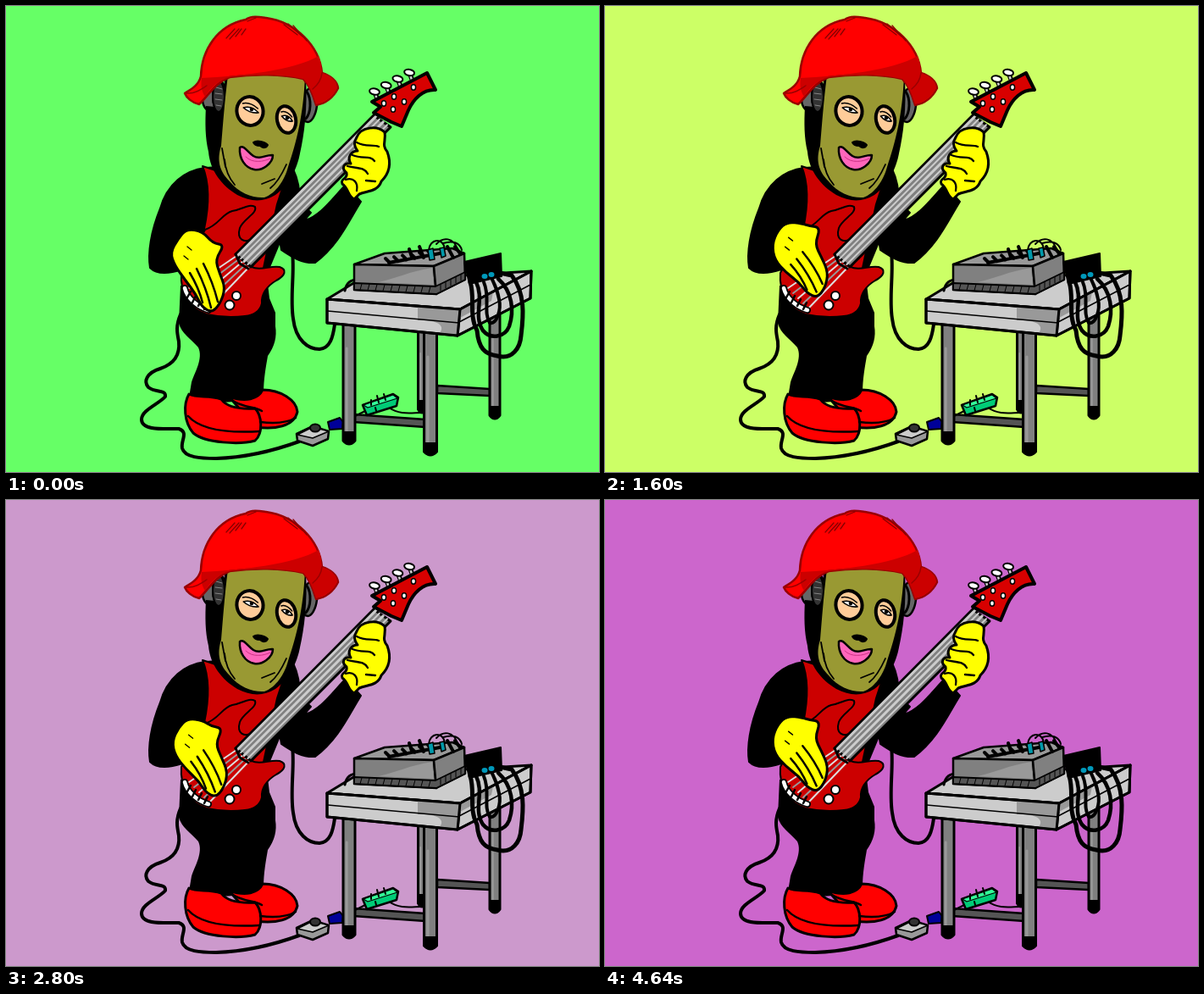
Recreate the animation shown at these times as an HTML page with a canvas. Size 700 by 550 pixels, loop 4720 ms.

```html
<!DOCTYPE html>
<html lang="en">
<head>
<meta charset="utf-8">
<title>Bass player</title>
<style>
html, body { margin: 0; width: 100%; height: 100%; overflow: hidden; }
canvas { display: block; }
</style>
</head>
<body>
<canvas id="stage" width="700" height="550"></canvas>
<script>
const ctx = document.getElementById('stage').getContext('2d');
const STEP = 80, STEPS = 59, CYCLE = 19;
const BLACK = '#000', RED = '#f00', DEEP = '#c00', YELLOW = '#ff0';

const backdrops = ['#66ff66', '#99ff66', '#99cc99', '#99cccc', '#66cccc', '#99ffcc',
  '#99ff99', '#ccff99', '#ccff66', '#cc9966', '#cc66cc', '#cc99cc'];

// Each head pose: hat shift and tilt, hood shift, feature shift and eye tilt
const headPoses = [
  { hat: [0, 0], tilt: 0, hood: [0, 0], face: [0, 0], eyes: 0 },
  { hat: [-10, -4], tilt: -5.8, hood: [-9, -6], face: [-5, -6], eyes: -7 },
  { hat: [-15.5, -8.5], tilt: -10.5, hood: [-13, -9], face: [-9, -10], eyes: -7 }
];
const strumKeys = [[0, 1], [1, .68], [6, 0], [7, .08], [11, .25], [16, .8], [19, 1]];

const highHand = [[204, 262], [206, 243], [220, 237], [235, 238], [236, 216], [247, 218],
  [249, 243], [263, 257], [273, 275], [275, 292], [267, 307], [255, 305], [240, 297], [218, 295], [203, 286]];
const lowHand = [[194, 291], [203, 275], [213, 263], [232, 266], [244, 280], [258, 282],
  [247, 299], [252, 315], [259, 333], [253, 351], [243, 362], [231, 355], [224, 340], [212, 324], [199, 306]];
const highFingers = [[234, 261, 271, 283], [229, 274, 266, 298], [224, 284, 252, 303]];
const lowFingers = [[233, 304, 250, 349], [225, 310, 242, 356], [217, 315, 232, 350]];

const mix = (a, b, t) => a + (b - a) * t;
const mixList = (a, b, t) => a.map((v, i) => mix(v, b[i], t));

function shape(d, fill, stroke = BLACK, width = 3) {
  const path = new Path2D(d);
  if (fill) { ctx.fillStyle = fill; ctx.fill(path); }
  if (stroke) { ctx.strokeStyle = stroke; ctx.lineWidth = width; ctx.stroke(path); }
}
const line = (d, color = BLACK, width = 3) => shape(d, null, color, width);

function oval(x, y, rx, ry, fill, width = 2, angle = 0) {
  ctx.beginPath();
  ctx.ellipse(x, y, rx, ry, angle, 0, Math.PI * 2);
  ctx.fillStyle = fill;
  ctx.fill();
  if (width) { ctx.strokeStyle = BLACK; ctx.lineWidth = width; ctx.stroke(); }
}

function moved([dx, dy], degrees, [px, py], draw) {
  ctx.save();
  ctx.translate(px + dx, py + dy);
  ctx.rotate(degrees * Math.PI / 180);
  ctx.translate(-px, -py);
  draw();
  ctx.restore();
}

function strumAt(phase) {
  const i = strumKeys.findIndex(k => k[0] > phase) - 1;
  const [a, va] = strumKeys[i], [b, vb] = strumKeys[i + 1];
  return mix(va, vb, (phase - a) / (b - a));
}

function headAt(phase) {
  if (phase < 3 || phase > 14) return headPoses[0];
  return headPoses[phase > 8 && phase < 13 ? 2 : 1];
}

function cables() {
  line('M206 364C200 378 202 386 204 396C206 416 194 424 182 428C166 433 162 443 168 450C177 457 189 452 188 461C180 470 160 477 160 488C160 501 185 499 204 499C216 503 206 513 208 522C211 533 230 534 248 534C282 533 313 526 346 514', BLACK, 4);
  line('M338 292C341 312 335 345 339 369C342 395 357 405 370 405C383 404 386 390 388 376', BLACK, 4);
}

function body() {
  shape('M206 330L204 374C207 387 218 392 227 403C233 416 223 432 219 444L216 462C245 472 285 468 304 458C304 440 307 425 309 413C317 402 320 390 318 378L318 362L311 345L308 320Z', BLACK, null);
  shape('M263 461C283 468 298 464 303 453C324 453 343 465 344 479C340 497 316 500 295 497Z', RED);
  shape('M216 458C209 470 210 491 221 504C235 516 276 518 294 513C304 504 302 483 294 475C277 476 261 474 254 464C239 459 226 463 216 458Z', RED);
  line('M215 484C231 502 267 504 300 502M265 464C279 475 294 472 302 478M300 491C317 493 332 492 342 486', BLACK, 2.5);
  shape('M235 191C211 194 190 210 182 239C171 266 167 292 170 309C179 318 196 315 208 311L220 345L306 320L347 221C343 206 338 194 336 185Z', BLACK, BLACK, 2);
  shape('M232 189C241 211 240 235 234 263L210 320L300 328L320 234L337 182L315 216Z', DEEP, BLACK, 2);
  shape('M338 190C344 203 348 216 346 231L360 244C357 248 354 250 353 253C372 247 386 226 401 211L419 231C405 253 393 282 365 303C350 304 338 297 325 288L318 245Z', BLACK, BLACK, 2);
}

function headphones() {
  oval(244, 109, 12, 16, '#666', 2.5, .1);
  oval(252, 107, 8, 19, '#333', 2);
  line('M248 96L257 98M247 103L257 104M247 110L257 111M248 117L256 118', '#888', 1);
  oval(358, 117, 9, 20, '#666', 2.5, .12);
  line('M355 101C361 110 360 126 354 133', BLACK, 3);
}

function hood() {
  headphones();
  shape('M258 84L257 120L236 118C235 138 235 155 239 172C241 195 255 212 273 223C290 232 305 231 318 223C336 210 344 190 347 174C352 152 356 122 354 84Z', BLACK, null);
  oval(251, 107, 7, 18, '#333', 2);
  line('M248 96L255 98M247 103L255 104M247 110L255 111M248 117L254 118', '#888', 1);
  shape('M262 82C258 112 256 142 254 165C249 181 251 194 264 207C275 221 292 227 305 226C319 221 329 205 333 190C343 160 351 130 353 82Z', '#999933', null);
  line('M258 181C259 194 264 204 270 211M259 190L255 168M312 215C320 209 326 198 331 187M302 210L317 204', BLACK, 1.8);
}

function eye(x, y, rx, ry, lookX) {
  oval(x, y, rx, ry, '#ffcc99', 4, -.2);
  shape(`M${x - rx * .5} ${y - 4}Q${x + 2} ${y - 7} ${x + rx * .65} ${y + 2}Q${x} ${y + 3} ${x - rx * .5} ${y - 4}Z`, '#fff', BLACK, 1.6);
  oval(x + lookX, y - 2, 2.3, 2.3, BLACK, 0);
  line(`M${x - rx * .55} ${y - 9}Q${x} ${y - 11} ${x + rx * .6} ${y - 3}`, BLACK, 1.5);
}

function features(tilt) {
  moved([0, 0], tilt, [309, 129], () => {
    eye(288, 124, 15.5, 17, 2);
    eye(331, 134, 11, 16, 1);
  });
  shape('M292 161C296 158 306 160 309 164C307 168 303 168 300 165C295 165 293 164 292 161Z', BLACK, BLACK, 2);
  shape('M276 167C281 164 285 172 292 177C300 182 307 175 315 176C315 186 302 195 293 193C282 191 275 180 276 167Z', '#ff66bb', BLACK, 2.5);
  line('M283 178C291 186 304 184 312 180', '#cc3388', 1);
}

function hat() {
  shape('M230 83C231 52 249 23 283 16C290 11 300 13 307 14C342 19 370 47 373 79C385 83 391 90 392 97C386 109 377 115 366 117C362 103 358 93 351 86C326 80 292 80 264 84C246 91 239 106 228 116C219 114 213 108 211 103C219 98 227 94 230 83Z', RED, '#900', 2.5);
  shape('M231 85C275 83 340 76 369 59C372 66 372 72 373 79C385 83 391 90 391 97C385 108 377 113 366 116C362 103 358 93 351 86C326 80 292 80 264 84C250 88 241 97 235 107C230 100 230 92 231 85Z', DEEP, null);
  line('M213 103C223 104 231 98 237 94M373 79C372 88 367 94 362 98', '#900', 1.5);
  line('M260 38L270 27M264 39L275 27M271 36L278 27M278 34L283 27M328 22L344 34M333 21L350 36M339 23L355 41M285 18L295 14', '#800', 1.3);
}

function guitar() {
  shape('M235 264C252 258 254 246 267 242C280 240 286 233 294 237C297 245 280 251 276 262C272 276 281 280 291 275L300 295L290 308C300 313 312 306 323 308C332 311 330 318 319 324C307 331 301 341 302 351C300 360 292 365 282 366C266 368 251 367 237 364C218 359 205 339 207 315Z', DEEP, BLACK, 2);
  for (let i = 0; i < 5; i++) {
    line(`M${272 + i * 4} ${295 + i * 3}L${216 + i * 6} ${333 + i * 6}`, i % 2 ? '#999' : '#ddd', 2);
  }
  shape('M434 129L454 143L289 308L271 293Z', '#808080', BLACK, 3);
  [.12, .34, .56, .8].forEach((t, i) => {
    line(`M${mix(434, 454, t)} ${mix(129, 143, t)}L${mix(271, 289, t)} ${mix(293, 308, t)}`, '#ccc', i % 2 ? 2 : 3);
  });
  line('M271 293L276 304L286 310', BLACK, 3);
  line('M211 333C214 346 228 356 239 359', BLACK, 8);
  line('M211 333C214 346 228 356 239 359', '#fff', 4.5);
  line('M218 337L214 344M224 342L220 350M231 346L227 354M238 350L234 358', BLACK, 2.5);
  oval(272, 342, 5, 5, '#fff');
  oval(264, 353, 5.5, 5.5, '#fff');
}

function headstock() {
  for (let i = 0; i < 4; i++) {
    const x = 435 + i * 13.7, y = 101 - i * 7.5;
    line(`M${x} ${y}L${x + 5} ${y + 13}`, BLACK, 5.5);
    line(`M${x} ${y}L${x + 4} ${y + 12}`, '#ccc', 2.5);
    oval(x, y, 6, 3.6, '#fff', 2, .2);
  }
  shape('M432 113L497 79L507 99C492 98 481 110 475 123L467 142L455 137L434 126L442 119Z', '#d80000', BLACK, 4);
  [[446, 115], [458, 107], [470, 113], [457, 122], [481, 96]].forEach(([x, y]) => oval(x, y, 2.6, 3.2, '#fff', 1.5));
}

function frettingHand() {
  shape('M414 155C419 142 439 141 447 149C449 159 443 164 450 172C456 188 451 199 443 207C439 219 427 218 417 222L411 228C403 224 405 216 397 210C394 203 404 205 402 197C395 191 399 185 407 186C402 178 408 171 415 171C410 164 411 160 414 155Z', YELLOW, BLACK, 3);
  line('M414 161C424 167 433 163 440 166M409 176C421 181 430 176 435 183M403 189C415 192 423 190 427 198M401 205C410 202 416 208 414 218M425 206L436 207', BLACK, 2.3);
}

function strummingHand(t) {
  const pts = highHand.map((p, i) => mixList(p, lowHand[i], t));
  const mid = (a, b) => mixList(a, b, .5);
  ctx.beginPath();
  ctx.moveTo(...mid(pts[pts.length - 1], pts[0]));
  pts.forEach((p, i) => ctx.quadraticCurveTo(...p, ...mid(p, pts[(i + 1) % pts.length])));
  ctx.closePath();
  ctx.fillStyle = YELLOW;
  ctx.fill();
  ctx.strokeStyle = BLACK;
  ctx.lineWidth = 3;
  ctx.stroke();
  highFingers.forEach((f, i) => {
    const [x1, y1, x2, y2] = mixList(f, lowFingers[i], t);
    const bend = mix(-3, 0, t);
    line(`M${x1} ${y1}Q${(x1 + x2) / 2 + 3} ${(y1 + y2) / 2 + bend} ${x2} ${y2}`, BLACK, 2.5);
  });
  const [kx, ky] = mixList([222, 250], [214, 284], t);
  line(`M${kx} ${ky}l5 4M${kx - 4} ${ky + 11}l5 4`, BLACK, 1.3);
}

function leg(x, top, bottom, width) {
  const l = x - width / 2, r = x + width / 2;
  shape(`M${l} ${top}L${l} ${bottom}Q${x} ${bottom + 8} ${r} ${bottom}L${r} ${top}Z`, '#808080', BLACK, 3);
  line(`M${l + width * .3} ${top + 30}L${l + width * .3} ${bottom - 9}`, '#999', width * .2);
  shape(`M${l} ${bottom - 10}L${l} ${bottom}Q${x} ${bottom + 8} ${r} ${bottom}L${r} ${bottom - 10}Z`, BLACK, BLACK, 2);
}

function pedals() {
  line('M396 492L424 478', BLACK, 2);
  line('M452 474C465 483 478 480 491 480', BLACK, 2);
  shape('M343 505L362 496L381 502L380 511L362 519L344 513Z', '#999', BLACK, 2.5);
  shape('M344 506L362 510L381 502L362 497Z', '#ccc', BLACK, 1.5);
  oval(365, 498, 6, 4.5, '#333');
  shape('M380 491L394 486L398 491L397 499L382 500Z', '#000099', BLACK, 2);
  shape('M421 471L457 458L463 462L461 472L426 483Z', '#00cc77', BLACK, 2.5);
  shape('M422 471L457 459L462 463L427 474Z', '#33ff99', BLACK, 1.2);
  line('M431 465L431 471M438 460L440 468M446 458L448 465M436 474L437 478', BLACK, 2);
}

function table() {
  leg(491, 380, 476, 9);
  shape('M410 482L495 488L495 497L410 491Z', '#555', BLACK, 2.5);
  shape('M509 448L571 452L571 460L509 457Z', '#555', BLACK, 2.5);
  pedals();
  leg(577, 362, 483, 12);
  leg(405, 374, 513, 14);
  leg(501, 384, 526, 15);
  shape('M379 346L412 326L620 313L536 358Z', '#ccc');
  shape('M379 346L536 358L533 389L379 374Z', '#ccc');
  shape('M536 358L620 313L619 345L533 389Z', '#ccc');
  shape('M486 354L535 358L533 388L512 386C520 375 505 370 486 371Z', '#999', null);
  shape('M537 359L575 338L573 348L536 368Z', '#999', null);
  line('M380 360L535 374M535 373L619 329', BLACK, 1.5);
  line('M379 346L536 358L533 389L379 374ZM536 358L620 313L619 345L533 389');
}

function mixer() {
  line('M400 336C402 326 407 323 416 323', BLACK, 3);
  shape('M411 305L447 292L527 286L541 292L505 307Z', '#999', BLACK, 2.5);
  shape('M411 305L505 307L508 340L411 335Z', '#808080', BLACK, 2.5);
  shape('M505 307L541 292L542 323L508 340Z', '#808080', BLACK, 2.5);
  shape('M440 326C462 321 477 313 503 309L505 329Z', '#999', null);
  shape('M411 327L507 331L542 314L542 323L508 340L411 335Z', '#555', BLACK, 1.8);
  for (let x = 420; x < 505; x += 9) line(`M${x} ${328 + (x - 420) / 24}l-2 7`, BLACK, 1);
  for (let x = 513; x < 540; x += 6) line(`M${x} ${329 - (x - 513) / 2}l0 7`, BLACK, 1);
  for (let i = 0; i < 6; i++) {
    const x = 448 + i * 10, y = 298 - i * 1.8;
    line(`M${x} ${y}l5 5M${x + 4} ${y + 5}l10 -2`, BLACK, 4);
  }
  line('M476 287L479 296M488 284L493 297', BLACK, 4);
  line('M499 288C500 275 516 272 518 287M508 281C516 272 528 273 533 287M516 280C528 276 536 280 538 288', BLACK, 2);
  shape('M498 288L504 286L506 299L500 300Z', '#0099aa', BLACK, 1.5);
  shape('M512 286L517 285L519 295L514 297Z', '#0099aa', BLACK, 1.5);
  line('M521 284L528 297M530 284L536 292', BLACK, 4);
}

function rack() {
  shape('M541 302L584 292L585 319L547 328Z', BLACK, BLACK, 2);
  oval(565, 319, 3.5, 3, '#0099bb', 0);
  oval(573, 317, 3.5, 3, '#0099bb', 0);
  line('M548 326C554 344 546 365 556 383C558 404 565 411 580 413C598 418 607 403 608 389C611 365 613 339 597 318L583 315', BLACK, 5);
  line('M555 326C565 346 551 365 563 383C572 394 589 391 594 378C600 360 598 337 581 322', BLACK, 4.5);
  line('M564 326C572 344 563 361 571 374C579 376 585 359 582 346C580 334 577 329 574 323', BLACK, 4);
}

function drawScene(step) {
  const phase = step % CYCLE, pose = headAt(phase);
  ctx.lineJoin = ctx.lineCap = 'round';
  ctx.fillStyle = backdrops[step % backdrops.length];
  ctx.fillRect(0, 0, 700, 550);
  cables();
  body();
  moved(pose.hood, 0, [0, 0], hood);
  moved(pose.face, 0, [0, 0], () => features(pose.eyes));
  moved(pose.hat, pose.tilt, [301, 98], hat);
  guitar();
  headstock();
  frettingHand();
  strummingHand(strumAt(phase));
  table();
  mixer();
  rack();
}

const start = performance.now();
function tick() {
  drawScene(Math.floor((performance.now() - start) / STEP) % STEPS);
  requestAnimationFrame(tick);
}
tick();
</script>
</body>
</html>
```
